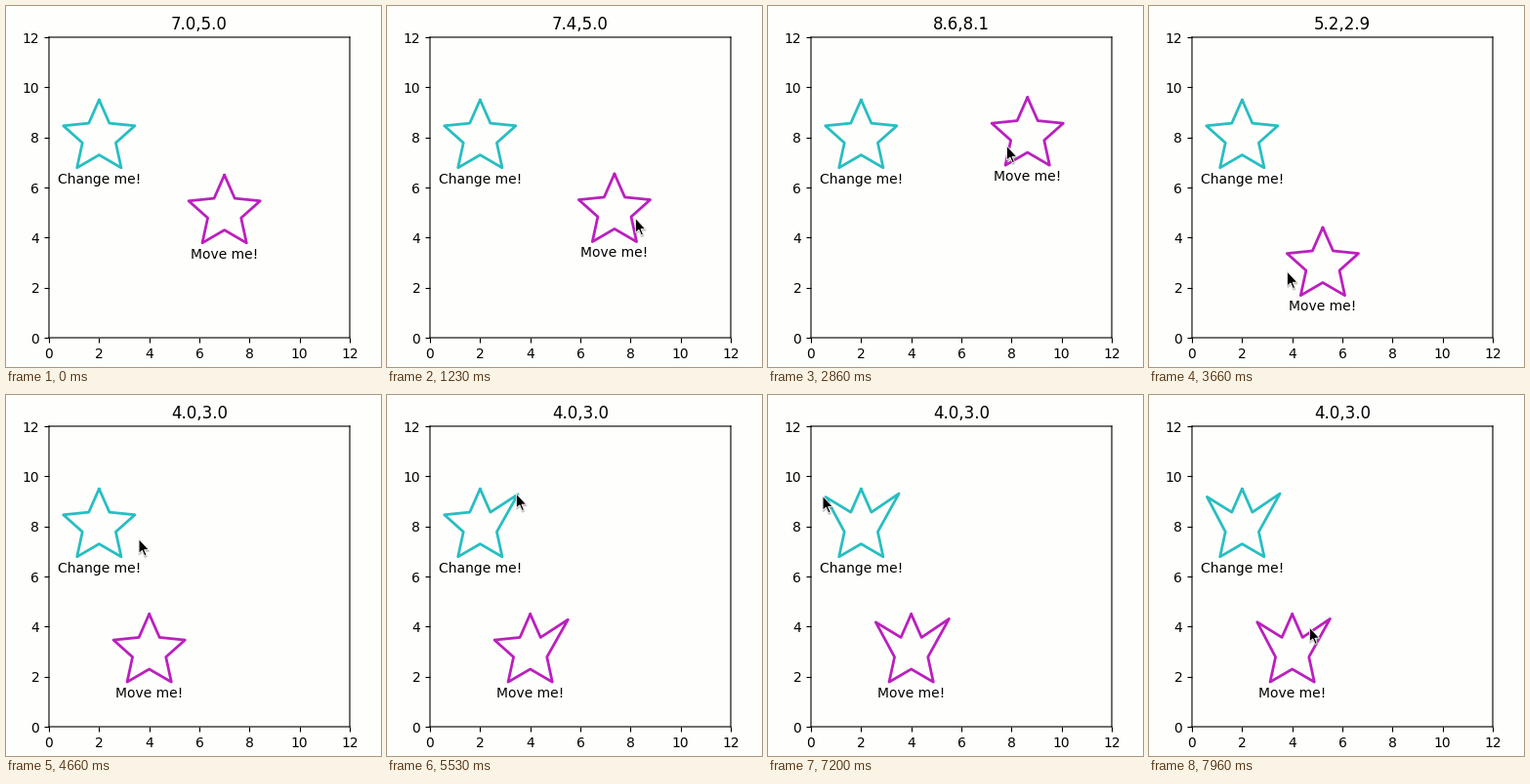
A matplotlib script for the animation above (8 s loop, 384 by 370 pixels).

```python
import numpy as np
import matplotlib.pyplot as plt
from matplotlib.animation import FuncAnimation
from matplotlib.patches import Polygon

W, H, DPI = 384, 370, 100
LOOP, STEP = 8000, 25
PAPER, TEAL, MAGENTA = "#fefefc", "#27bec2", "#ba20be"
RIGHT_TIP, LEFT_TIP = 8, 2
CURSOR_IN = 330

# Spans in ms while the mouse button is held down.
DRAG_UP, DRAG_DOWN = (1000, 1900), (3030, 3860)
PULL_RIGHT, PULL_LEFT = (4960, 5600), (6660, 7230)


def travel(pos, legs, t):
    """Ease from pos along (span, goal, sag) legs; sag bows the path midway."""
    pos = np.array(pos, float)
    for (begin, end), goal, sag in legs:
        if t < begin:
            break
        u = min((t - begin) / (end - begin), 1)
        u = u * u * (3 - 2 * u)
        pos = pos + (goal - pos) * u + 4 * u * (1 - u) * np.array(sag)
    return pos


def pointer_at(t):
    """Mouse pointer, in pixels from the top left."""
    return travel((348, 320), [
        ((CURSOR_IN, 860), (244, 211), (0, 0)),
        (DRAG_UP, (281, 140), (10, 33)),
        ((2040, 2850), (245, 143), (-121, -141)),
        (DRAG_DOWN, (129, 267), (-10, 46)),
        ((4510, 4720), (132, 121), (7, -15)),
        (PULL_RIGHT, (133, 100), (0, 0)),
        ((5810, 6630), (57, 122), (-25, 0)),
        (PULL_LEFT, (57, 103), (-13, 0)),
        ((7440, 7960), (165, 238), (0, 0)),
    ], t)


def centre_at(t):
    """Centre of the dragged star, in data units."""
    return travel((7, 5), [
        (DRAG_UP, (8.638, 8.1), (0.2, -0.83)),
        (DRAG_DOWN, (4, 3), (0.89, -1.7)),
    ], t)


def shape_at(t, outer=1.5, inner=0.7):
    """Star outline around the origin, with its side tips pulled."""
    angles = np.pi / 2 + np.arange(10) * np.pi / 5
    radii = np.where(np.arange(10) % 2, inner, outer)
    pts = np.column_stack([radii * np.cos(angles), radii * np.sin(angles)])
    pts[RIGHT_TIP] = travel(pts[RIGHT_TIP],
                            [(PULL_RIGHT, (1.51, 1.31), (0, 0))], t)
    pts[LEFT_TIP] = travel(pts[LEFT_TIP],
                           [(PULL_LEFT, (-1.4, 1.18), (-0.5, 0))], t)
    return pts


class Star:
    def __init__(self, ax, label, color):
        self.line, = ax.plot([], [], color=color, lw=2,
                             solid_joinstyle="round", solid_capstyle="round")
        self.text = ax.text(0, 0, label, ha="center", va="baseline")

    def place(self, shape, centre):
        pts = shape + centre
        self.line.set_data(*np.vstack([pts, pts[:1]]).T)
        self.text.set_position((centre[0], centre[1] - 1.83))


fig = plt.figure(figsize=(W / DPI, H / DPI), dpi=DPI, facecolor=PAPER)
ax = fig.add_axes([44 / W, 30 / H, 308 / W, 308 / H], facecolor=PAPER)
ax.set(xlim=(0, 12), ylim=(0, 12), xticks=range(0, 13, 2),
       yticks=range(0, 13, 2))
for spine in ax.spines.values():
    spine.set_snap(False)
title = ax.set_title("")
fixed = Star(ax, "Change me!", TEAL)
moving = Star(ax, "Move me!", MAGENTA)

overlay = fig.add_axes([0, 0, 1, 1])
overlay.set(xlim=(0, W), ylim=(H, 0))
overlay.axis("off")
ARROW = np.array([(-0.5, 0.3), (-0.5, 15), (2.9, 12), (5.3, 17.6),
                  (7.4, 16.8), (5, 11.3), (9.7, 11.3)])
shadow = overlay.add_patch(Polygon(ARROW, fc="#777777", ec="#777777",
                                   lw=1, alpha=0.3))
arrow = overlay.add_patch(Polygon(ARROW, fc="black", ec="#f4f4f4", lw=0.6))


def draw(i):
    t = i * STEP
    shape, centre, tip = shape_at(t), centre_at(t), pointer_at(t)
    fixed.place(shape, np.array([2, 8]))
    moving.place(shape, centre)
    title.set_text(f"{centre[0]:.1f},{centre[1]:.1f}")

    arrow.set_xy(ARROW + tip)
    shadow.set_xy(ARROW + tip + (0.3, 1.5))
    for part in (arrow, shadow):
        part.set_visible(t >= CURSOR_IN)
    return fixed.line, moving.line, moving.text, title, shadow, arrow


anim = FuncAnimation(fig, draw, frames=LOOP // STEP, interval=STEP,
                     repeat=True, repeat_delay=0)
plt.show()
```
